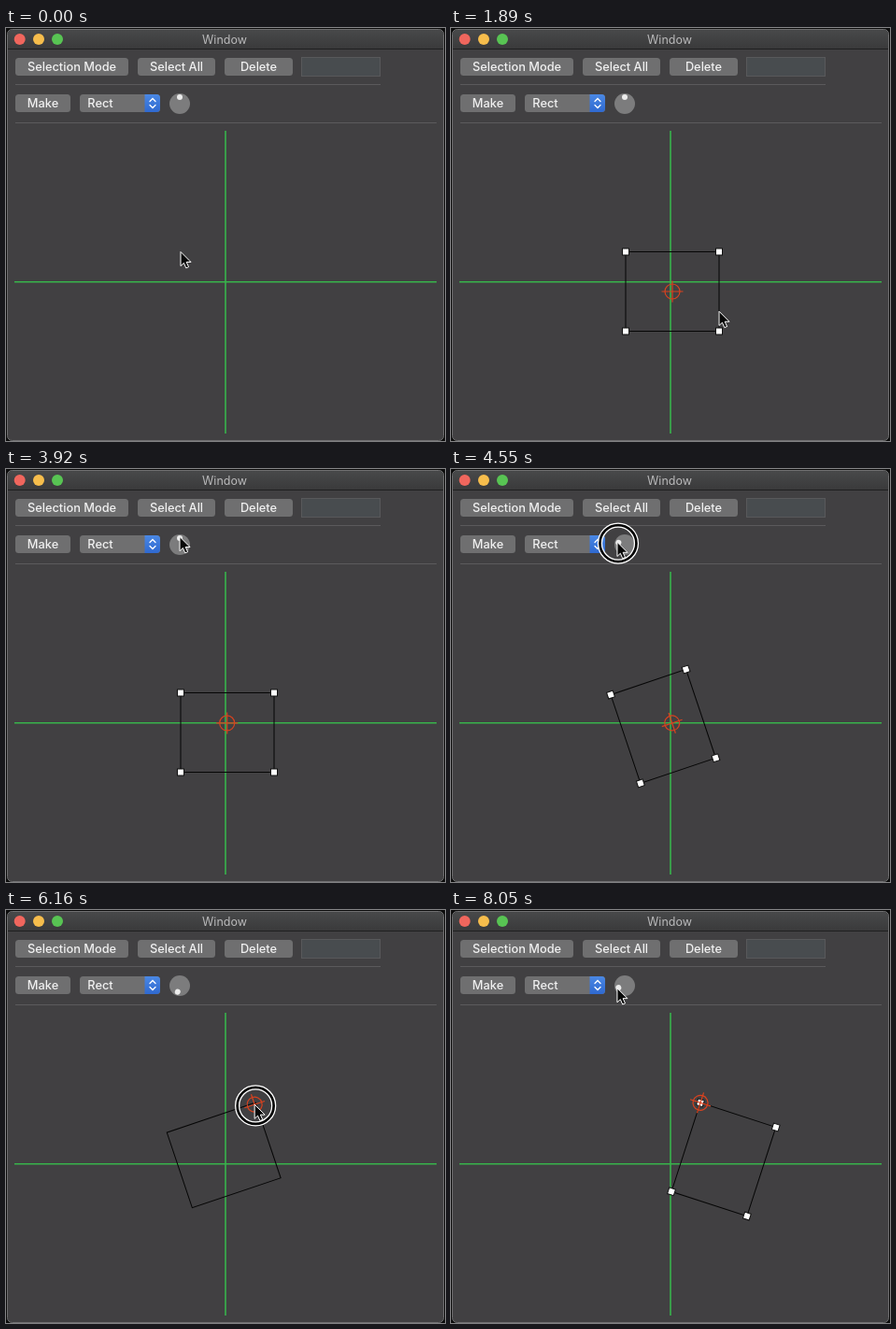
Recreate the animation shown at these times as an HTML page. Size 470 by 442 pixels, loop 8120 ms.

```html
<!DOCTYPE html>
<html lang="en">
<head>
<meta charset="utf-8">
<title>Window</title>
<style>
  html, body { margin: 0; width: 100%; height: 100%; overflow: hidden; background: #0c0c0c; }
  svg { display: block; width: 470px; height: 442px; }
  text { font: 500 12.8px Inter, Roboto, sans-serif; fill: #f0f0f0; text-anchor: middle; }
  .title { font-weight: 400; font-size: 12.5px; fill: #b9b9ba; }
  .button { fill: #6f6f70; }
  .rule { stroke: #5b5a5c; }
  .axis { stroke: #38b34b; stroke-width: 1.6; }
  .outline { fill: none; stroke: #050505; }
  .handle { fill: #fff; stroke: #111; }
  .pivot { fill: none; stroke: #d9421f; stroke-width: 1.2; }
  .ring { fill: none; stroke: #fff; stroke-width: 1.3; }
  .ring .band { stroke: #050505; stroke-width: 3.2; }
</style>
</head>
<body>
<svg viewBox="0 0 470 442">
  <defs>
    <linearGradient id="bar" x2="0" y2="1">
      <stop stop-color="#48494a"/><stop offset="1" stop-color="#3a3a3b"/>
    </linearGradient>
    <linearGradient id="blue" x2="0" y2="1">
      <stop stop-color="#4a88e4"/><stop offset="1" stop-color="#2f69d0"/>
    </linearGradient>
  </defs>

  <rect x="1.5" y="1.5" width="467" height="440" rx="5" fill="#414042" stroke="#6f6f70"/>
  <path d="M2 22V7Q2 2 7 2H463Q468 2 468 7V22Z" fill="url(#bar)"/>
  <path d="M2 22.5H468" stroke="#1f1f20"/>
  <circle cx="14.7" cy="12" r="6" fill="#f0665d"/>
  <circle cx="35" cy="12" r="6" fill="#f6bd4c"/>
  <circle cx="55" cy="12" r="6" fill="#58c453"/>
  <text class="title" x="234" y="16.8">Window</text>

  <g id="buttons"></g>
  <rect x="316.5" y="31.5" width="84" height="20" fill="#484c4f" stroke="#58595b"/>
  <path class="rule" d="M10 60.5H401M10 101.5H461"/>
  <path d="M148.5 71H161a4 4 0 0 1 4 4v11a4 4 0 0 1-4 4h-12.5z" fill="url(#blue)"/>
  <path d="M154 78.5l3-3 3 3M154 82.5l3 3 3-3" fill="none" stroke="#fff" stroke-width="1.3" stroke-linecap="round"/>
  <circle cx="186" cy="81" r="11" fill="#7c7c7d"/>
  <circle id="knob" cx="186" cy="74" r="3" fill="#ececec"/>

  <path class="axis" d="M9 271.8H461M235 110V434"/>
  <g id="shape">
    <rect id="box" class="outline"/>
    <g id="handles"></g>
  </g>
  <g id="pivot" class="pivot">
    <circle r="8"/><path d="M-11.5 0H11.5M0-11.5V11.5"/>
  </g>
  <g id="pointer">
    <g id="ring" class="ring" transform="translate(1 1.3)">
      <circle class="band" r="19.5"/><circle r="21.5"/><circle r="17.5"/>
    </g>
    <path d="M0 0V15.2L3.4 12L5.8 17.4L8.6 16.2L6.2 11H11Z" fill="#080808" stroke="#fff" stroke-linejoin="round"/>
  </g>
</svg>
<script>
const LOOP = 8120, STEP = 70;
const box = { x: 187, y: 239.5, w: 100, h: 85 };
const corner = (u, v) => [box.x + box.w * u, box.y + box.h * v];
const firstPivot = [236.7, 271.9], secondPivot = [267, 206.3];
const $ = id => document.getElementById(id);

const mix = (a, b, p) => a + (b - a) * p;
const mixPoint = (a, b, p) => a.map((v, i) => mix(v, b[i], p));
const clamp = p => Math.min(1, Math.max(0, p));
const smooth = p => p * p * (3 - 2 * p);

// Each gesture is one press of the mouse; at(p) is where the pointer is.
const drag = (from, to, a, b) => ({ from, to, at: p => mixPoint(a, b, p) });
const click = (from, to, point) => drag(from, to, point, point);
const spin = (from, to, a, b) => {
  const angle = p => mix(a, b, p);
  const at = p => {
    const r = angle(p) * Math.PI / 180;
    return [186 - 8.5 * Math.sin(r), 81 - 8.5 * Math.cos(r)];
  };
  return { from, to, angle, at };
};

const create = drag(210, 840, corner(0, 0), corner(1, 1));
const deselect = click(1050, 1330, [316, 301]);
const select = click(1750, 1890, corner(1, .75));
const place = drag(2240, 2940, [248, 275], firstPivot);
const turn = spin(4130, 5040, 0, 161.4);
const replace = drag(5530, 6230, firstPivot, secondPivot);
const turnMore = spin(7070, 7980, 173.7, 108);
const gestures = [create, deselect, select, place, turn, replace, turnMore];

const progress = (g, t) => smooth(clamp((t - g.from) / (g.to - g.from)));
const active = (g, t) => t >= g.from && t < g.to;

// Between gestures the pointer travels for three quarters of the gap, then rests.
function pointerAt(t) {
  const next = gestures.findIndex(g => t < g.from);
  if (next === 0) return create.at(0);
  const last = gestures.at(next < 0 ? -1 : next - 1);
  if (next < 0 || t < last.to) return last.at(progress(last, t));
  const { from, at } = gestures[next];
  return mixPoint(last.at(1), at(0), clamp((t - last.to) / (from - last.to) / .75));
}

function pivotAt(t) {
  if (t < place.from) return corner(.5, .5);
  const g = t < replace.from ? place : replace;
  return g.at(progress(g, t));
}

function add(parent, tag, attrs, label = "") {
  const el = document.createElementNS("http://www.w3.org/2000/svg", tag);
  set(el, attrs);
  el.textContent = label;
  parent.append(el);
}

function set(el, attrs) {
  for (const name in attrs) el.setAttribute(name, attrs[name]);
}

const show = (el, on) => set(el, { visibility: on ? "visible" : "hidden" });
const place2d = (el, transform) => set(el, { transform });

function addButton(label, x, y, width, textX = x + width / 2) {
  add($("buttons"), "rect", { class: "button", x, y, width, height: 19, rx: 3.5 });
  add($("buttons"), "text", { x: textX, y: y + 14 }, label);
}

addButton("Selection Mode", 10, 32, 121);
addButton("Select All", 141, 32, 83);
addButton("Delete", 234, 32, 73);
addButton("Make", 10, 71, 59);
addButton("Rect", 79, 71, 86, 101);

set($("box"), { x: box.x, y: box.y });
for (const u of [0, 1])
  for (const v of [0, 1]) {
    const [x, y] = corner(u, v);
    add($("handles"), "rect", { class: "handle", x: x - 3.5, y: y - 3.5, width: 7, height: 7 });
  }

function draw(t) {
  const grow = progress(create, t);
  set($("box"), { width: box.w * grow, height: box.h * grow });
  show($("box"), grow > 0);

  // The second turn is made around the moved pivot.
  const first = turn.angle(progress(turn, t));
  const angle = t < turnMore.from ? first : turnMore.angle(progress(turnMore, t));
  place2d($("shape"), `rotate(${angle - first} ${secondPivot}) rotate(${first} ${firstPivot})`);
  place2d($("pivot"), `translate(${pivotAt(t)}) rotate(${angle})`);
  place2d($("knob"), `rotate(${-angle} 186 81)`);
  place2d($("pointer"), `translate(${pointerAt(t)})`);

  const selected = t >= select.from;
  show($("pivot"), selected);
  show($("handles"), selected && !active(place, t) && !active(replace, t));
  show($("ring"), gestures.some(g => active(g, t)));
}

let start;
function tick(now) {
  start ??= now;
  draw(Math.floor(((now - start) % LOOP) / STEP) * STEP);
  requestAnimationFrame(tick);
}
draw(0);
requestAnimationFrame(tick);
</script>
</body>
</html>
```
